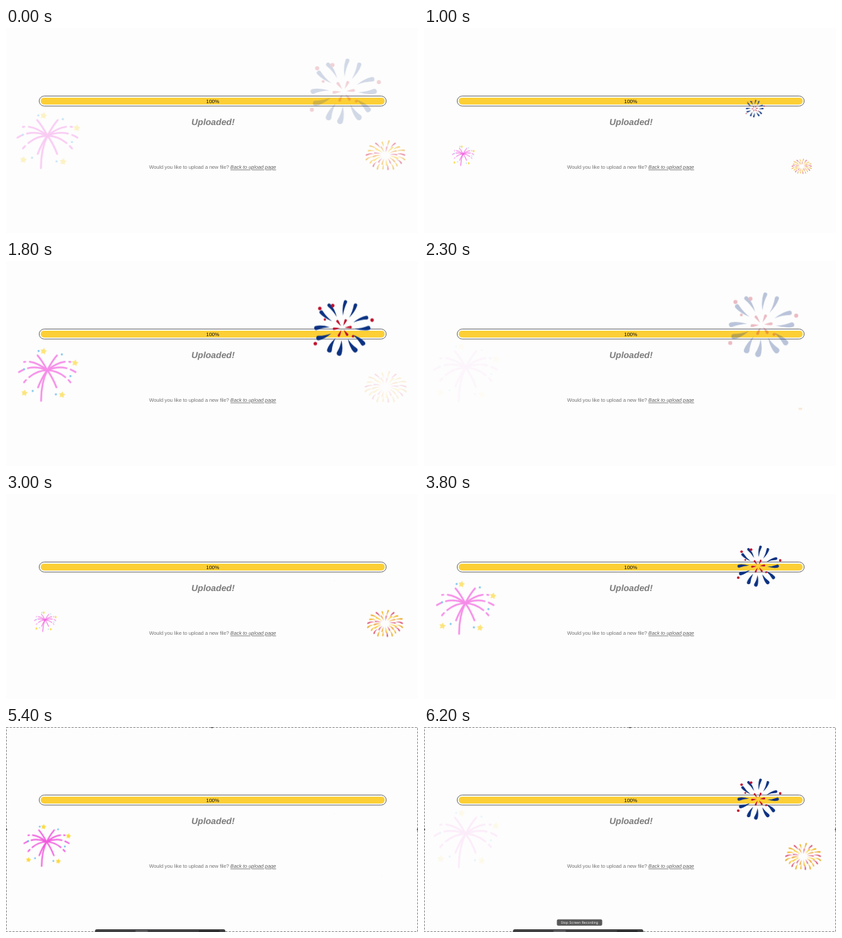
An HTML page that plays this animation: 600x300 px, repeating every 6.3 s.

```html
<!DOCTYPE html>
<html lang="en">
<head>
<meta charset="utf-8">
<title>Upload complete</title>
<style>
  html, body { margin: 0; width: 100%; height: 100%; overflow: hidden; background: #fdfdfd; }
  svg { display: block; width: 100vw; height: 100vh; }
  text { font-family: "Liberation Sans", Arial, sans-serif; text-rendering: geometricPrecision; }
  .link { font-style: italic; text-decoration: underline; text-decoration-thickness: 0.5px; text-underline-offset: 0.6px; }

  .burst {
    --clock: 0;
    transform-origin: 0 0;
    animation: burst var(--period) ease infinite paused;
    /* 24 s is a whole number of every period; each burst begins at 560 ms */
    animation-delay: calc(560ms - 24s - var(--clock) * 1ms);
  }
  #blue { --period: 2400ms; }
  #pink { --period: 2000ms; }
  #gold { --period: 1600ms; }
  @keyframes burst {
    from { transform: scale(0); }
    0%, 52% { opacity: 1; }
    to { transform: scale(1); opacity: 0; }
  }

  .arms { fill: none; stroke: #f258de; stroke-width: 2.8; stroke-linecap: round; }
  [hidden] { display: none; }
</style>
</head>
<body>
<svg viewBox="0 0 600 300">
  <rect x="48.3" y="99.6" width="505.4" height="14.6" rx="7.3" fill="#fff" stroke="#686868"/>
  <rect x="50.5" y="101.9" width="501" height="10.1" rx="5" fill="#fdcf36"/>
  <text x="301" y="109.8" font-size="7.4" text-anchor="middle" fill="#111">100%</text>
  <text x="301.5" y="142" font-size="12.9" font-weight="bold" font-style="italic" text-anchor="middle" fill="#7c7c7c">Uploaded!</text>
  <text x="208.5" y="206.4" font-size="7.3" fill="#727272">Would you like to upload a new file? <tspan class="link" fill="#606060">Back to upload page</tspan></text>

  <!-- Each burst grows out of its launch point and is drawn around its own centre -->
  <g transform="translate(55 199)"><g id="pink" class="burst"></g></g>
  <g transform="translate(478 127)"><g id="blue" class="burst"></g></g>
  <g transform="translate(547.5 219)"><g id="gold" class="burst"></g></g>

  <g id="selection" hidden>
    <rect x=".5" y=".5" width="599" height="299" fill="none" stroke="#858585" stroke-dasharray="3 2"/>
    <g fill="#555">
      <circle cx="300" cy="0" r="1.7"/>
      <circle cx="0" cy="150" r="1.7"/>
      <circle cx="600" cy="150" r="1.7"/>
    </g>
    <rect x="129.5" y="296" width="190" height="9" rx="3" fill="#404042"/>
    <rect x="188.5" y="297.5" width="18" height="4" rx="1" fill="#646466"/>
    <rect x="281" y="297.5" width="30" height="4" rx="1" fill="#2c2c2e"/>
  </g>
  <g id="tooltip" hidden>
    <rect x="193.5" y="281.5" width="66" height="9.2" rx="2" fill="#585859"/>
    <text x="226.5" y="287.9" font-size="5" text-anchor="middle" fill="#f4f4f4" style="font-family: Inter, sans-serif">Stop Screen Recording</text>
  </g>
</svg>
<script>
  const LOOP = 6300, STEP = 100;
  const SELECTION_AT = 5200, TOOLTIP_AT = 5900;
  const { cos, sin, PI } = Math;
  const byId = id => document.getElementById(id);
  const times = (n, draw) => Array.from({ length: n }, (_, i) => draw(i)).join('');
  const group = (x, y, content) => `<g transform="translate(${x} ${y})">${content}</g>`;
  const dot = (x, y, r, color) => `<circle cx="${x}" cy="${y}" r="${r}" fill="${color}"/>`;

  // Curved teardrop pointing out from the centre, from radius `from` to radius `to`
  function petal(angle, from, to, r, color, { bend = 0, squash = 1 } = {}) {
    const at = (d, turn = 0) => [d * cos(angle + turn), d * sin(angle + turn) * squash];
    const [tx, ty] = at(from), [hx, hy] = at(to - r, bend), [mx, my] = at((from + to) / 2, -bend / 2);
    const along = Math.atan2(hy - my, hx - mx);
    const nx = -sin(along) * r, ny = cos(along) * r;
    return `<path fill="${color}" d="M${tx} ${ty}Q${mx - nx * .7} ${my - ny * .7} ${hx - nx} ${hy - ny}` +
      `A${r} ${r} 0 0 1 ${hx + nx} ${hy + ny}Q${mx + nx * .7} ${my + ny * .7} ${tx} ${ty}Z"/>`;
  }

  function star(x, y, r, color) {
    const points = times(10, i => {
      const a = i * PI / 5 - 1.4, d = i % 2 ? r * 0.52 : r;
      return `${x + d * cos(a)},${y + d * sin(a)} `;
    });
    return `<polygon points="${points}" fill="${color}"/>`;
  }

  function blueBurst() {
    const navy = '#0c3282', red = '#c0102c';
    const petals = times(12, i => {
      const a = i * PI / 6 + 0.06;
      return petal(a, 22, 50, 3.7 + 0.7 * sin(a), navy, { bend: 0.06 * (i % 2 ? 1 : -1) });
    });
    const core = times(6, i => petal(i * PI / 3 - 0.1, 4, 17, 2.2, red));
    const sparks = [[-40, -35], [-17, -40], [53, -14], [-48, 28]].map(([x, y]) => dot(x, y, 3.1, red));
    const embers = [[19, 15], [-31, -15]].map(([x, y]) => dot(x, y, 2.2, red));
    return group(14.3, -35.5, petals + core + sparks.join('') + embers.join(''));
  }

  function pinkBurst() {
    const arm = (a, side) => {
      const x = side * 46 * cos(a), y = 3 + 29 * sin(a);
      return `<path d="M0 0Q${x * 0.55} ${y * 0.5 - 12 * cos(a)} ${x} ${y}"/>`;
    };
    const arms = times(10, i => arm((Math.floor(i / 2) - 2) * 0.61, i % 2 ? 1 : -1));
    const trunk = '<path d="M0 0Q-10 20-10 50"/>';
    const stars = [[-6, -31], [45, -12], [-37, 37], [24, 40]].map(([x, y]) => star(x, y, 5.7, '#fcd83c'));
    const sparks = times(6, i => {
      const a = i * PI / 3 - 0.9, y = 4 + 38 * sin(a);
      return dot(38 * cos(a), y, 1.6, '#38a8e8');
    });
    return group(5.6, -43.5,
      `<g class="arms"><g stroke-dasharray="32 7 9 99">${arms}</g>${trunk}</g>` + stars.join('') + sparks);
  }

  // Two staggered rings of streaks on a flattened circle
  function goldBurst() {
    const ring = (count, from, to, colors) => times(count, i => {
      const a = (i + 0.5) / count * 2 * PI;
      return petal(a, from, to - (i % 3) * 1.5, 1.15, colors[i % colors.length],
        { bend: 0.13 * cos(a), squash: 0.74 });
    });
    return group(5.5, -35.5,
      ring(20, 18, 33, ['#e8a210', '#d83c62', '#f2b010']) +
      ring(15, 7, 22, ['#fbc61a', '#f0a02c', '#e0688a']));
  }

  byId('blue').innerHTML = blueBurst();
  byId('pink').innerHTML = pinkBurst();
  byId('gold').innerHTML = goldBurst();

  const bursts = document.querySelectorAll('.burst');
  const start = performance.now();
  function render() {
    const elapsed = Math.max(0, performance.now() - start) % LOOP;
    const clock = Math.floor(elapsed / STEP) * STEP;
    bursts.forEach(b => b.style.setProperty('--clock', clock));
    byId('selection').toggleAttribute('hidden', clock < SELECTION_AT);
    byId('tooltip').toggleAttribute('hidden', clock < TOOLTIP_AT);
    requestAnimationFrame(render);
  }
  render();
</script>
</body>
</html>
```
